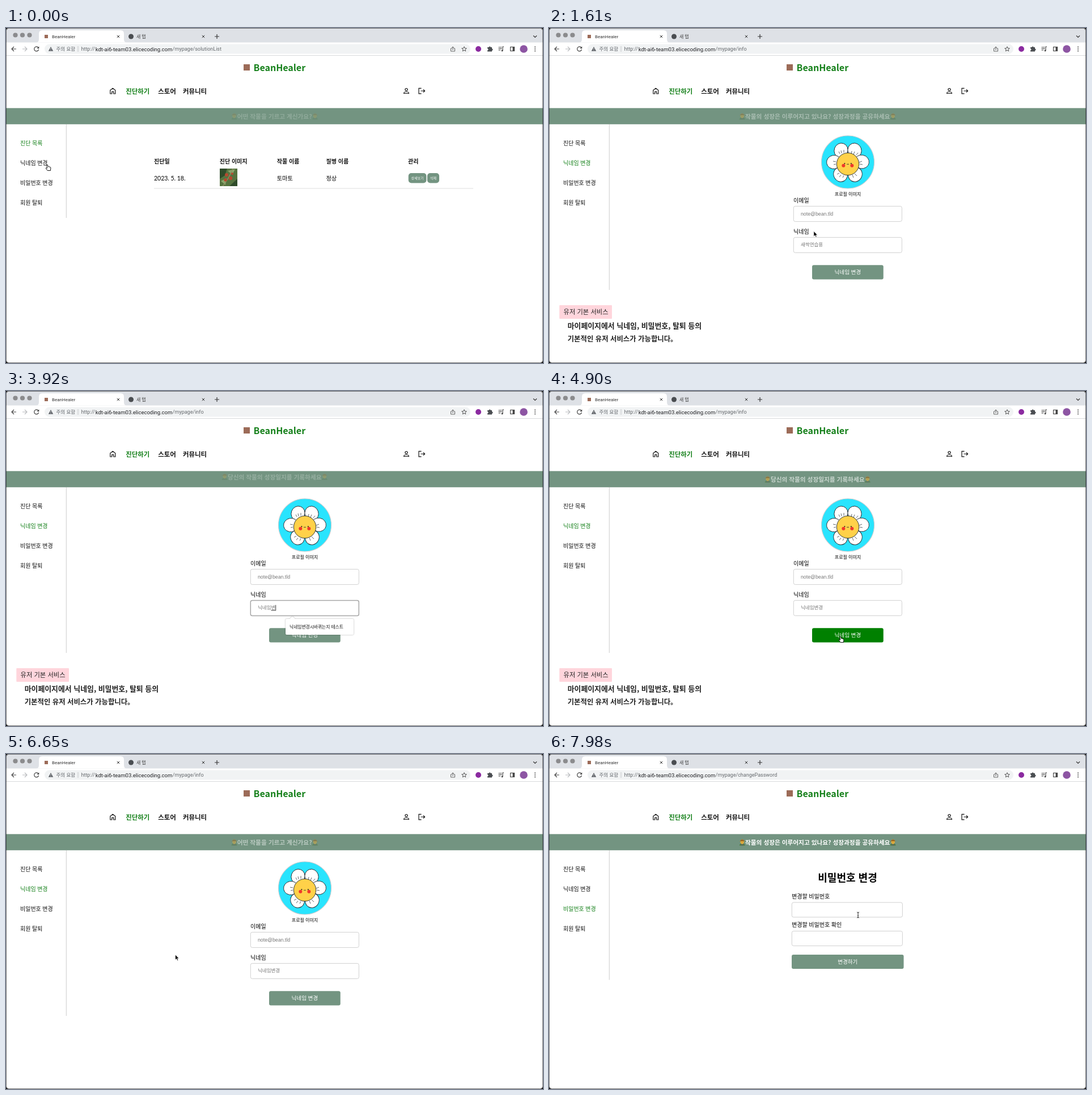
These frames come from a looping animation (947 by 591 pixels, 8 s). An HTML page:

```html
<!DOCTYPE html>
<html lang="ko">
<head>
<meta charset="utf-8">
<title>BeanHealer</title>
<style>
html, body { margin: 0; width: 100%; height: 100%; overflow: hidden; background: #000; }
svg { display: block; width: 100vw; height: 100vh; }
text { font-family: Lato, "Noto Sans CJK KR", "Noto Sans CJK", sans-serif; white-space: pre; }
.ui { font-family: Roboto, "Noto Sans CJK KR", sans-serif; }
.kr { font-family: "Noto Sans CJK KR", "Noto Sans CJK", sans-serif; }
.field { font-family: "Liberation Sans", "Noto Sans CJK KR", sans-serif; }
</style>
</head>
<body>
<svg id="stage" viewBox="0 0 947 591" preserveAspectRatio="none"></svg>
<script>
const LOOP = 8000;
const SAGE = '#739481', GREEN = '#15801a', INK = '#111';
const stage = document.getElementById('stage');

// ---- markup helpers; text is placed by its vertical centre ----
const text = (x, y, size, str, attrs = '') =>
  `<text x="${x}" y="${y + size * 0.38}" font-size="${size}" ${attrs}>${str}</text>`;
const rect = (x, y, w, h, fill, attrs = '') =>
  `<rect x="${x}" y="${y}" width="${w}" height="${h}" fill="${fill}" ${attrs}/>`;
const dot = (x, y, r, fill, attrs = '') =>
  `<circle cx="${x}" cy="${y}" r="${r}" fill="${fill}" ${attrs}/>`;
const line = (d, color = '#444', w = 1, attrs = '') =>
  `<path d="${d}" fill="none" stroke="${color}" stroke-width="${w}" ${attrs}/>`;
const shape = (d, fill, attrs = '') => `<path d="${d}" fill="${fill}" ${attrs}/>`;
const group = (id, body, attrs = '') => `<g id="${id}" ${attrs}>${body}</g>`;
const mid = 'text-anchor="middle"';
const bold = 'font-weight="700"';
const cross = (x, y, r) => line(`M${x - r} ${y - r}l${2 * r} ${2 * r}m0 ${-2 * r}l${-2 * r} ${2 * r}`, '#333', 1);
const box = (x, y, w, h, id = '') =>
  rect(x + .3, y + .4, w, h, '#fff', `rx="3" stroke="#d0d0d0" ${id && `id="${id}"`}`);
const button = (x, y, w, h, label, size, id = '') =>
  rect(x, y, w, h, SAGE, `rx="3" ${id && `id="${id}"`}`) +
  text(x + w / 2, y + h / 2 - .3, size, label, `${mid} fill="#fff"`);

// ---- browser window ----
const tabs =
  rect(0, 0, 947, 26, '#dee1e6') +
  [16.5, 29, 41.5].map(x => dot(x, 12.5, 4.1, '#8b8b8d')).join('') +
  shape('M53 25.5Q58 25.5 58 20V10Q58 4 64 4H202Q208 4 208 10V20Q208 25.5 213 25.5Z', '#fff') +
  rect(68, 12, 6, 6, '#9c6b58') +
  text(81, 14.5, 8, 'BeanHealer', 'class="ui" fill="#333"') + cross(198, 15, 2.2) +
  dot(220.5, 15, 4.5, '#4a4d51') +
  text(230, 14.5, 8, '새 탭', 'class="ui" fill="#444"') + cross(348, 15, 2.2) +
  line('M368 15h8m-4 -4v8', '#333', 1.2) +
  line('M930 13.5l3 3l3 -3', '#333', 1.2);

const toolbar =
  rect(0, 25.5, 947, 23, '#fff') +
  rect(68, 28.5, 751, 17, '#f1f3f4', 'rx="8.5"') +
  line('M18 37H10m4 -4l-4 4l4 4', '#444', 1.2) +
  line('M29 37h8m-4 -4l4 4l-4 4', '#b8babd', 1.2) +
  line('M57 34.6A4 4 0 1 0 57.6 38', '#444', 1.2) + shape('M58.3 32.5v3.8h-3.8z', '#444') +
  shape('M79 33l4.2 7.8h-8.4z', '#5f6368') + line('M79 35.5v2.6m0 .8v1', '#f1f3f4', .8) +
  text(88.5, 36.7, 8.5, '주의 요함', 'class="kr" fill="#5f6368"') +
  line('M127 32v10', '#c4c6c9', 1) +
  text(132.5, 37, 9, 'http://', 'class="ui" fill="#666a6e"') +
  text(157.7, 37, 9.5, 'kdt-ai6-team03.elicecoding.com', 'class="ui" fill="#202124"') +
  text(293.8, 37, 9, '', 'class="ui" fill="#666a6e" id="path"') +
  line('M786.5 36h-2v5h7v-5h-2m-1.5 3v-6m-2 2l2 -2l2 2', '#555', .9) +
  line('M808 32.8l1.2 2.9l3.1 .2l-2.4 2l.8 3l-2.7 -1.7l-2.7 1.7l.8 -3l-2.4 -2l3.1 -.2z', '#444', .9) +
  dot(833, 37, 5, '#8b2aa0') +
  shape('M849 34h2.5a1.6 1.6 0 0 1 3.2 0h2.3v2.5a1.6 1.6 0 0 1 0 3.2v1.8h-8v-2.3a1.5 1.5 0 0 0 0 -3z', '#4b4e52') +
  line('M868.5 34h6m-6 2.5h6m-6 2.5h3.5m4 1v-7h2', '#444', 1.1) + dot(875, 40, 1.4, '#444') +
  rect(889.5, 33.5, 7, 7, 'none', 'stroke="#444" stroke-width="1.1"') + rect(893.5, 33, 3.5, 8, '#444') +
  dot(913, 37, 6.8, '#8d55a3') +
  [33.5, 37, 40.5].map(y => dot(933, y, .95, '#444')).join('') +
  line('M0 48.5H947', '#d9dadc');

// ---- site header and side menu ----
const header =
  rect(419, 64, 11, 11, '#9c6b58') +
  text(436.5, 69.8, 16, 'BeanHealer', `class="kr" ${bold} fill="${GREEN}"`) +
  line('M183.8 109.8v6.2h3v-3.7h3v3.7h3v-6.2l-4.5 -3.5z', INK, 1.2) +
  text(211.3, 111.3, 11.4, '진단하기', `class="kr" ${bold} fill="${GREEN}"`) +
  text(268.3, 111.3, 11.4, '스토어', `class="kr" ${bold} fill="${INK}"`) +
  text(312, 111.3, 11.4, '커뮤니티', `class="kr" ${bold} fill="${INK}"`) +
  dot(706, 108.6, 2.1, 'none', `stroke="${INK}" stroke-width="1.2"`) +
  line('M701.7 115.5v-1.3q1 -1.7 4.3 -1.7t4.3 1.7v1.3z', INK, 1.2) +
  line('M732.5 106.3h-4.5v9.5h4.5m-1 -4.8h7m-2.5 -2.5l2.5 2.5l-2.5 2.5', INK, 1.2) +
  rect(0, 141.3, 947, 28.5, SAGE);

const menu = ['진단 목록', '닉네임 변경', '비밀번호 변경', '회원 탈퇴']
  .map((s, i) => text(25, 203.4 + i * 34.9, 10, s, `id="menu${i}"`)).join('');

const farmer = id => group(id,
  shape('M-5 5.5Q-4.5 1.5 0 1.5T5 5.5Z', '#4f7f45') +
  shape('M-2.5 2V5.5H2.5V2Z', '#5d6f58') +
  dot(0, -.4, 3.1, '#e8b23c') +
  shape('M-5.5 -1.6Q-3 -2.6 -2.8 -4Q-2 -5.5 0 -5.5T2.8 -4Q3 -2.6 5.5 -1.6Q0 -3 -5.5 -1.6Z', '#b07a2a') +
  line('M-2.8 -3Q0 -3.8 2.8 -3', '#6d451a', .8) +
  dot(-1.1, -.5, .45, '#4a3215') + dot(1.1, -.5, .45, '#4a3215'));
const banner = group('banner',
  text(473.7, 0, 10.65, '', `${mid} class="kr" ${bold} fill="#fff" id="slogan"`) +
  farmer('farmerL') + farmer('farmerR'));

// ---- pages ----
const photo = '<svg x="377" y="248" width="31" height="31">' +
  rect(0, 0, 31, 31, '#55733f') +
  shape('M0 0H13L9 12L0 18ZM17 31L31 18V31Z', '#2f4b2a') +
  shape('M14 4L27 1L22 11ZM2 22L12 17L10 29Z', '#8aa56a') +
  line('M5 31Q16 18 23 0', '#8c8f63', 1.4) +
  [[12, 11, 3], [19, 17, 3.2], [10, 20, 2.8], [22, 9, 2]].map(a => dot(...a, '#b5482f')).join('') + '</svg>';

const pill = (x, w, s) => rect(x, 256, w, 17.5, SAGE, 'rx="5"') +
  text(x + w / 2, 264.6, 6, s, `${mid} fill="#fff"`);
const listPage =
  [[261, '진단일'], [376.7, '진단 이미지'], [477.7, '작물 이름'], [564.5, '질병 이름'], [709, '관리']]
    .map(([x, s]) => text(x, 235.3, 10, s, `${bold} class="kr" fill="${INK}"`)).join('') +
  text(261, 265.3, 10.5, '2023. 5. 18.') + photo +
  text(477.7, 265.3, 10.2, '토마토') + text(564.5, 265.3, 10.2, '정상') +
  pill(709.7, 31.7, '상세보기') + pill(743, 21, '삭제') +
  line('M261 283H824', '#ddd');

const petals = [[515, 216, 20], [539, 216, -20], [502.5, 236.5, 80], [551.5, 236, -80], [514, 258.5, -30], [540, 258.5, 30]];
const flower =
  dot(527, 236.5, 46.5, '#29e4fe', 'stroke="#c4cccf" stroke-width="1.1"') +
  petals.map(([x, y, a]) =>
    `<ellipse cx="${x}" cy="${y}" rx="12" ry="13" transform="rotate(${a} ${x} ${y})" fill="#fff" stroke="#222c33" stroke-width=".9"/>`).join('') +
  line('M513 222l-2 -4m5 3l-1 -5m5 4v-5m13 7l1 -5m3 6l2 -5m3 6l3 -4' +
    'M506 236l-5 -1m5 5l-4 1m45 -4l5 -2m-4 5l5 1M512 256l-4 2m7 1l-3 4m8 -3l-2 4m17 -5l2 5m2 -7l4 4', '#222c33', .7) +
  dot(527, 240, 19.7, '#ffd149', 'stroke="#222c33" stroke-width=".9"') +
  dot(519.3, 242.7, 3, '#f0392b') + dot(534.3, 242.7, 3, '#f0392b') +
  dot(521.4, 239, 1, '#222') + dot(532.8, 239, 1, '#222') +
  line('M525 240q1 1.2 2 0q1 1.2 2 0', '#222', .8);

const infoPage = flower +
  text(527, 293.3, 8.05, '프로필 이미지', mid) +
  text(431, 303.8, 10, '이메일') + box(431, 314, 191, 27) +
  text(444, 327.6, 8.75, 'note@bean.tld', 'class="field" fill="#777"') +
  text(431, 358.8, 10, '닉네임') + box(431, 369, 191, 27, 'nameBox') +
  text(444, 382, 8.5, '', 'class="field" fill="#777" id="nick"') +
  line('M0 377.5v10', '#333', .9, 'id="caret"') + line('', '#333', 1, 'id="underline"') +
  button(464, 418.3, 125.7, 25.1, '닉네임 변경', 9.6, 'save') +
  group('popup',
    shape('M495 402H500L505 397.7L510 402H611Q613 402 613 404V428Q613 430 611 430H495Q493 430 493 428V404Q493 402 495 402Z',
      '#fff', 'style="filter:drop-shadow(0 .6px 1.2px rgba(0,0,0,.35))"') +
    text(500, 415.8, 7.75, '닉네임변경시바뀌는지 테스트', `class="kr" fill="${INK}"`));

const passPage =
  text(526.5, 218.3, 18, '비밀번호 변경', `${mid} ${bold} class="kr" fill="#000"`) +
  text(428, 251.3, 10.05, '변경할 비밀번호') + box(428, 261.5, 195, 26) +
  text(428, 301.6, 10.05, '변경할 비밀번호 확인') + box(428, 312, 195, 26) +
  button(428, 354, 197.5, 25, '변경하기', 9.5);

const caption =
  rect(18.3, 489, 92.7, 24, '#ffd5dc', 'rx="1"') +
  text(25.5, 500.7, 11.3, '유저 기본 서비스', 'class="kr" font-weight="500"') +
  text(32.7, 524.8, 12.9, '마이페이지에서 닉네임, 비밀번호, 탈퇴 등의', `class="kr" ${bold}`) +
  text(32.7, 548, 12.4, '기본적인 유저 서비스가 가능합니다。', `class="kr" ${bold}`);

// ---- pointers, drawn around their hot spot ----
const pointers =
  group('arrow', shape('M0 0V9.2L2.2 7.2L3.7 10.5L5.2 9.8L3.8 6.7H6.6Z', '#000', 'stroke="#fff" stroke-width=".7"')) +
  group('hand', shape('M-1.3 1Q-1 -.4 .4 .4L1.4 3.7L3.8 3.9Q6 4.3 5.9 6L5.4 10.5H.2L-2.7 6.7Q-2.9 5.2 -1 5.9L-.3 6.2Z',
    '#fff', 'stroke="#000" stroke-width=".9" stroke-linejoin="round"')) +
  group('beam', line('M-2 -5Q0 -5 0 -3.5Q0 -5 2 -5M0 -4V4M-2 5Q0 5 0 3.5Q0 5 2 5M-1 .8h2', '#222', .9));

stage.innerHTML = '<clipPath id="win"><rect width="947" height="591" rx="5"/></clipPath>' +
  '<g clip-path="url(#win)">' + rect(0, 0, 947, 591, '#fff') + tabs + toolbar + header + banner + menu +
  line('', '#ccc', 1, 'id="divider"') +
  group('page0', listPage) + group('page1', infoPage) + group('page2', passPage) +
  group('caption', caption, 'fill="#222"') + '</g>' +
  rect(.3, .3, 946.4, 590.4, 'none', 'rx="5" stroke="#222" stroke-width=".8"') +
  pointers;

// ---- timeline ----
const $ = {};
stage.querySelectorAll('[id]').forEach(e => $[e.id] = e);
const show = (e, on) => e.setAttribute('visibility', on ? 'visible' : 'hidden');
const clamp = v => Math.min(1, Math.max(0, v));
const ease = p => p * p * (3 - 2 * p);
const latest = (table, t) => table.filter(r => r[0] <= t).pop();

const PAGES = [[0, 0], [210, 1], [7250, 2]];
const PATHS = ['/mypage/solutionList', '/mypage/info', '/mypage/changePassword'];
const DIVIDER_END = [335, 462, 398.5];
const SLOGANS = ['어떤 작물을 기르고 계신가요?', '작물의 성장은 이루어지고 있나요? 성장과정을 공유하세요', '', '당신의 작물의 성장일지를 기록하세요'];

const HOLDER = '새싹연습용';
const FOCUS = 2100, BLUR = 4760, POPUP_END = 4600;
const TYPING = [[0, HOLDER], [2590, 's'], [2870, HOLDER],
  ...['ㄴ', '니', '닉', '닉ㄴ', '닉네', '닉네ㅇ', '닉네이', '닉네임', '닉네임ㅂ', '닉네임벼', '닉네임변', '닉네임변ㄱ', '닉네임변겨', '닉네임변경']
    .map((s, i) => [3150 + i * 75, s])];

const MOVES = [[0, 73, 241], [250, 73, 241], [700, 329.5, 279], [1000, 329.5, 279], [1900, 511, 384], [4420, 511, 384],
  [4720, 514, 433], [5450, 514, 433], [6150, 298.5, 354], [6700, 298.5, 354], [7080, 57, 269], [7300, 57, 269],
  [7840, 545, 284], [LOOP, 545, 284]];

function pointerAt(t) {
  const i = Math.max(1, MOVES.findIndex(m => m[0] > t));
  const [t0, x0, y0] = MOVES[i - 1], [t1, x1, y1] = MOVES[i];
  const p = ease(clamp((t - t0) / (t1 - t0)));
  return [x0 + (x1 - x0) * p, y0 + (y1 - y0) * p];
}

function drawBanner(t) {
  const since = t + 1305, age = since % 1700;
  const str = SLOGANS[Math.floor(since / 1700) % 4];
  const rise = clamp(age / 500);
  $.slogan.textContent = str;
  const half = $.slogan.getComputedTextLength() / 2 + 5.3;
  $.farmerL.setAttribute('transform', `translate(${473.7 - half} 0)`);
  $.farmerR.setAttribute('transform', `translate(${473.7 + half} 0)`);
  $.banner.setAttribute('transform', `translate(0 ${150 + 6 * rise})`);
  $.banner.setAttribute('opacity', str ? Math.min(rise, clamp((1410 - age) / 500)) : 0);
}

function drawField(t, onInfo) {
  const [at, str] = latest(TYPING, t);
  const focused = onInfo && t >= FOCUS && t < BLUR;
  const composing = focused && at >= 3150;
  $.nick.textContent = str;
  $.nameBox.setAttribute('stroke', focused ? '#a6a6a6' : '#d0d0d0');
  $.nameBox.setAttribute('stroke-width', focused ? 1.5 : 1);
  const end = 444 + (str === HOLDER ? 0 : $.nick.getComputedTextLength());
  $.caret.setAttribute('transform', `translate(${end + .4} 0)`);
  show($.caret, focused && Math.floor((t - Math.max(at, FOCUS)) / 530) % 2 === 0);
  $.underline.setAttribute('d', `M${end - 7.8} 387H${end}`);
  show($.underline, composing);
  show($.popup, composing && t < POPUP_END);
}

function drawPointer(t, page) {
  const [x, y] = pointerAt(t);
  const inside = (l, r, top, bottom) => x > l && x < r && y > top && y < bottom;
  const onSave = page === 1 && inside(464, 589, 418, 443);
  const onLink = inside(20, 84, 195, 315) || onSave;
  const onField = page === 1 ? inside(431, 622, 369, 396) || inside(431, 622, 314, 341)
    : page === 2 && (inside(428, 624, 262, 288) || inside(428, 624, 312, 338));
  const kind = t >= 2590 && t < 4420 ? '' : onLink ? 'hand' : onField ? 'beam' : 'arrow';
  for (const k of ['arrow', 'hand', 'beam']) {
    show($[k], k === kind);
    $[k].setAttribute('transform', `translate(${x} ${y})`);
  }
  $.save.setAttribute('fill', onSave && kind ? '#008000' : SAGE);
}

function render(t) {
  const page = latest(PAGES, t)[1];
  for (let i = 0; i < 4; i++) $['menu' + i].setAttribute('fill', i === page ? GREEN : INK);
  for (let i = 0; i < 3; i++) $['page' + i].setAttribute('display', i === page ? 'inline' : 'none');
  $.path.textContent = PATHS[page];
  $.divider.setAttribute('d', `M106.3 170V${DIVIDER_END[page]}`);
  drawBanner(t);
  drawField(t, page === 1);
  drawPointer(t, page);
  const enter = clamp((t - 350) / 500);
  $.caption.setAttribute('opacity', Math.min(clamp(enter * 1.3), clamp((5900 - t) / 250)));
  $.caption.setAttribute('transform', `translate(${-25 * (1 - enter) ** 2} 0)`);
}

const start = performance.now();
function tick() {
  render((performance.now() - start) % LOOP);
  requestAnimationFrame(tick);
}
tick();
</script>
</body>
</html>
```
